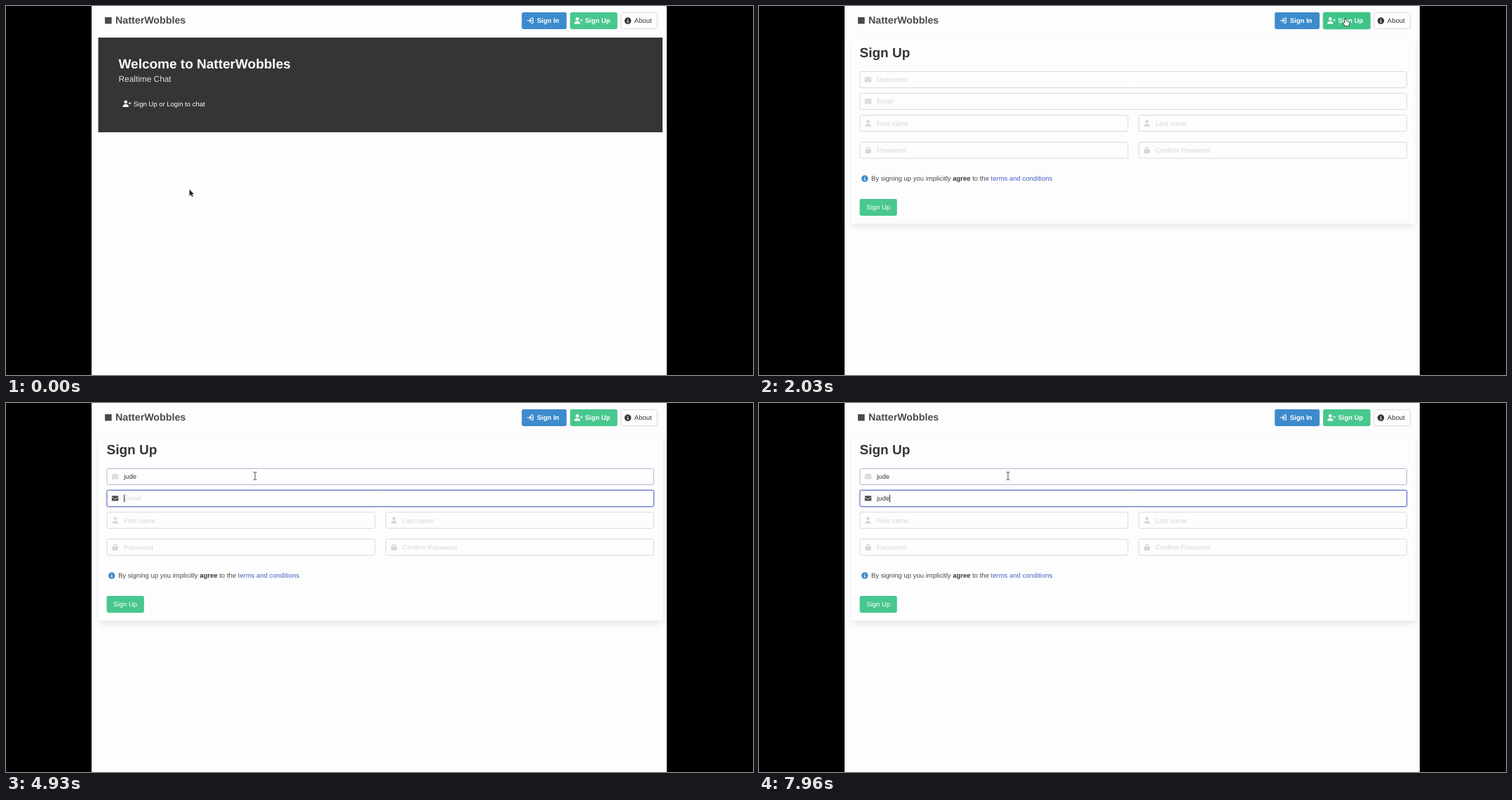
Write an HTML page with a canvas that moves like this. It is 1065 px wide and 526 px high and loops after 8000 ms.

```html
<!DOCTYPE html>
<html lang="en">
<head>
<meta charset="utf-8">
<title>Realtime Chat</title>
<style>
  html, body { margin: 0; width: 100%; height: 100%; overflow: hidden; background: #000; }
  canvas { display: block; width: 1065px; height: 526px; }
</style>
</head>
<body>
<canvas id="stage" width="1065" height="526"></canvas>
<script>
const ctx = document.getElementById('stage').getContext('2d');
const LOOP = 8000, REM = 9.5;
const FONT = '"Liberation Sans", Arial, sans-serif';
const BRAND = 'NatterWobbles';
const PAPER = '#fdfdfd', DARK = '#363636', BODY = '#4a4a4a', PALE = '#d8d6d9';
const BLUE = '#3d8bcd', GREEN = '#48c78e', LINK = '#485fc7';

const PAGE_AT = 1830, FOCUS_AT = 3250, TAB_AT = 4700;
// Typed text: [time, value]
const USER_KEYS = [[3900, 'j'], [4060, 'ju'], [4200, 'jud'], [4340, 'jude']];
const MAIL_KEYS = [[5450, 'h'], [5600, 'hu'], [6150, 'h'], [6300, ''],
  [6900, 'j'], [7080, 'ju'], [7240, 'jud'], [7500, 'jude']];

const BUTTONS = {
  signIn: [735.3, 9, 64, 24],
  signUp: [804.2, 9, 67.5, 24],
  about: [876.8, 9, 52, 24]
};
const FIELDS = [
  ['Username', 143.5, 93, 780.5, 'mail'],
  ['Email', 143.5, 124, 780.5, 'mail'],
  ['First name', 143.5, 155.2, 383, 'user'],
  ['Last name', 541, 155.2, 383, 'user'],
  ['Password', 143.5, 193.6, 383, 'lock'],
  ['Confirm Password', 541, 193.6, 383, 'lock']
];

function text(str, x, y, color, size = REM, bold = false) {
  ctx.font = `${bold ? 'bold ' : ''}${size}px ${FONT}`;
  ctx.fillStyle = color;
  ctx.fillText(str, x, y);
  return x + ctx.measureText(str).width;
}

function box(x, y, w, h, r, fill) {
  ctx.beginPath();
  ctx.roundRect(x, y, w, h, r);
  ctx.fillStyle = fill;
  ctx.fill();
}

function frame(x, y, w, h, r, color, width = 1) {
  ctx.beginPath();
  ctx.roundRect(x, y, w, h, r);
  ctx.strokeStyle = color;
  ctx.lineWidth = width;
  ctx.stroke();
}

function disc(x, y, r) {
  ctx.beginPath();
  ctx.arc(x, y, r, 0, 7);
  ctx.fill();
}

function strokePath(d, color, width) {
  ctx.strokeStyle = color;
  ctx.lineWidth = width;
  ctx.stroke(new Path2D(d));
}

// Icons are drawn on a 512-unit grid, one rem tall
const ICONS = {
  user(color) {
    disc(224, 128, 128);
    ctx.fill(new Path2D('M178 304C80 304 0 384 0 482Q0 512 30 512H418Q448 512 448 482C448 384 368 304 270 304Z'));
  },
  userPlus(color) {
    ICONS.user(color);
    strokePath('M464 224H616M540 148V300', color, 48);
  },
  signIn(color) {
    strokePath('M32 256H340M224 128L352 256L224 384M352 64H416Q480 64 480 128V384Q480 448 416 448H352', color, 64);
  },
  info(color, inner) {
    disc(256, 256, 256);
    ctx.fillStyle = inner;
    disc(256, 160, 36);
    strokePath('M226 246H264V360M220 360H300', inner, 48);
  },
  mail(color) {
    box(0, 64, 512, 384, 50, color);
    strokePath('M-10 150L230 325Q256 342 282 325L522 150', PAPER, 42);
  },
  lock(color) {
    box(0, 192, 448, 320, 64, color);
    strokePath('M112 200V144A112 112 0 0 1 336 144V200', color, 64);
  }
};

function icon(name, x, y, color, inner = PAPER) {
  ctx.save();
  ctx.translate(x, y);
  ctx.scale(REM / 512, REM / 512);
  ctx.lineCap = ctx.lineJoin = 'round';
  ctx.fillStyle = color;
  ICONS[name](color, inner);
  ctx.restore();
}

const ease = p => p < 0.5 ? 4 * p ** 3 : 1 - (2 - 2 * p) ** 3 / 2;

function glide(t, start, end, from, to, bend) {
  const p = ease(Math.min(1, Math.max(0, (t - start) / (end - start))));
  const lift = bend * 4 * p * (1 - p);
  return [from[0] + (to[0] - from[0]) * p, from[1] + (to[1] - from[1]) * p + lift];
}

function pointerAt(t) {
  const rest = [261.5, 261.5], button = [841.5, 16.8], field = [355, 104];
  return t < PAGE_AT
    ? glide(t, 550, 1350, rest, button, 15)
    : glide(t, 1950, 2540, button, field, 15);
}

const inside = ([px, py], [x, y, w, h]) => px >= x && px <= x + w && py >= y && py <= y + h;

function typed(keys, t) {
  let value = '';
  for (const [at, v] of keys) if (t >= at) value = v;
  return value;
}

function caretOn(t) {
  const marks = [FOCUS_AT, TAB_AT, ...[...USER_KEYS, ...MAIL_KEYS].map(k => k[0])];
  const last = Math.max(...marks.filter(m => m <= t));
  return (t - last) % 1000 < 500;
}

function drawHeader(t, mouse) {
  const { signIn, signUp, about } = BUTTONS;
  box(141, 16, 9.6, 9.4, 0, BODY);
  text(BRAND, 156, 24.6, BODY, REM * 1.5, true);

  box(...signIn, 2.4, inside(mouse, signIn) ? '#3685c4' : BLUE);
  icon('signIn', 742.5, 16, '#fff');
  text('Sign In', 757, 24, '#fff', REM, true);

  const pressed = t >= 1640 && t < PAGE_AT;
  box(...signUp, 2.4, pressed ? '#3abb81' : inside(mouse, signUp) ? '#3ec487' : GREEN);
  if (t >= 1640 && t < FOCUS_AT) {
    const [x, y, w, h] = signUp;
    frame(x - 0.6, y - 0.6, w + 1.2, h + 1.2, 3, 'rgba(72,199,142,.25)', 1.2);
  }
  icon('userPlus', 810.3, 16, '#fff');
  text('Sign Up', 825.5, 24, '#fff', REM, true);

  const [x, y, w, h] = about;
  frame(x + 0.2, y + 0.5, w - 0.6, h - 1, 2.4, inside(mouse, about) ? '#b5b5b5' : '#dbdbe0');
  icon('info', 881.8, 16.3, DARK);
  text('About', 895.8, 24.2, DARK);
}

function drawHome() {
  box(131.5, 45, 804.5, 135, 0, '#353535');
  text('Welcome to ' + BRAND, 160.5, 89.4, '#fdfdfd', REM * 2, true);
  text('Realtime Chat', 160.5, 108, '#dfdfdf', REM * 1.25);
  icon('userPlus', 166.5, 134.4, '#fdfdfd');
  text('Sign Up or Login to chat', 181.7, 142.8, '#fdfdfd');
}

function drawField([label, x, y, w, glyph], value, focused, hovered, caret) {
  const h = 24;
  if (focused) frame(x - 0.5, y - 0.5, w + 1, h + 1, 3, 'rgba(72,95,199,.25)', 1.4);
  const edge = focused ? '#6375ca' : hovered ? '#b7b5d2' : '#dad8e4';
  frame(x + 0.5, y + 0.5, w - 1, h - 1, 2.4, edge);
  icon(glyph, x + (glyph === 'mail' ? 7.3 : 8), y + 7.1, focused ? BODY : PALE);
  const end = x + 24.5, base = y + 15.3;
  if (!value) text(label, end, base, '#d6d5da');
  const stop = value ? text(value, end, base, DARK) : end;
  if (focused && caret) {
    ctx.fillStyle = DARK;
    ctx.fillRect(Math.round(stop), y + 6.5, 1, 11);
  }
}

function drawForm(t, mouse) {
  ctx.save();
  ctx.beginPath();
  ctx.rect(122, 40, 820, 486);
  ctx.clip();
  ctx.shadowColor = 'rgba(10,10,10,.1)';
  ctx.shadowBlur = 9.5;
  ctx.shadowOffsetY = 4.75;
  box(132.7, 46, 802.1, 263.5, 3.6, PAPER);
  ctx.restore();
  box(131.5, 45, 804.5, 265.5, 3.6, PAPER);
  frame(131.2, 44.7, 805.1, 266.1, 3.6, 'rgba(10,10,10,.02)', 0.6);

  text('Sign Up', 143.5, 72.6, DARK, REM * 2, true);

  const active = t >= TAB_AT ? 1 : t >= FOCUS_AT ? 0 : -1;
  const values = [typed(USER_KEYS, t), typed(MAIL_KEYS, t)];
  FIELDS.forEach((f, i) => {
    const over = inside(mouse, [f[1], f[2], f[3], 24]);
    drawField(f, values[i], i === active, over, caretOn(t));
  });

  icon('info', 146, 241.3, BLUE);
  let x = text('By signing up you implicitly ', 160, 248.8, BODY);
  x = text('agree', x, 248.8, DARK, REM, true);
  x = text(' to the ', x, 248.8, BODY);
  text('terms and conditions', x, 248.8, LINK);

  box(143.5, 275, 53.3, 24, 2.4, GREEN);
  text('Sign Up', 153.3, 290.4, '#fff');
}

const CURSORS = {
  arrow: 'M0 0V9.2L2.1 7.3L3.6 10.6L5.1 9.9L3.7 6.8H6.5Z',
  hand: 'M-1 .9Q0-.6 1 .9V3.8L4.4 4.6Q5.3 5 5.1 6.2L4.4 10H-.8L-3.3 6.4Q-3.3 5-2 5.4L-1 6.3Z'
};

function drawPointer(mouse, onForm) {
  const onButton = Object.values(BUTTONS).some(b => inside(mouse, b));
  const onField = onForm && FIELDS.some(f => inside(mouse, [f[1], f[2], f[3], 24]));
  ctx.save();
  ctx.translate(...mouse);
  ctx.lineJoin = 'round';
  if (onField) {
    strokePath('M-2.5-5.3H-.7L0-4.7L.7-5.3H2.5M0-4.7V4.7M-2.5 5.3H-.7L0 4.7L.7 5.3H2.5', '#4c4c58', 1);
  } else {
    const shape = CURSORS[onButton ? 'hand' : 'arrow'];
    strokePath(shape, onButton ? '#222' : '#fff', 1.4);
    ctx.fillStyle = onButton ? '#fff' : '#222';
    ctx.fill(new Path2D(shape));
  }
  ctx.restore();
}

function draw(t) {
  const onForm = t >= PAGE_AT;
  const mouse = pointerAt(t);
  ctx.fillStyle = '#000';
  ctx.fillRect(0, 0, 1065, 526);
  ctx.fillStyle = PAPER;
  ctx.fillRect(122, 0, 820, 526);
  drawHeader(t, mouse);
  if (onForm) drawForm(t, mouse);
  else drawHome();
  drawPointer(mouse, onForm);
}

ctx.textRendering = 'geometricPrecision';
const began = performance.now();
function tick() {
  draw((performance.now() - began) % LOOP);
  requestAnimationFrame(tick);
}
tick();
</script>
</body>
</html>
```
